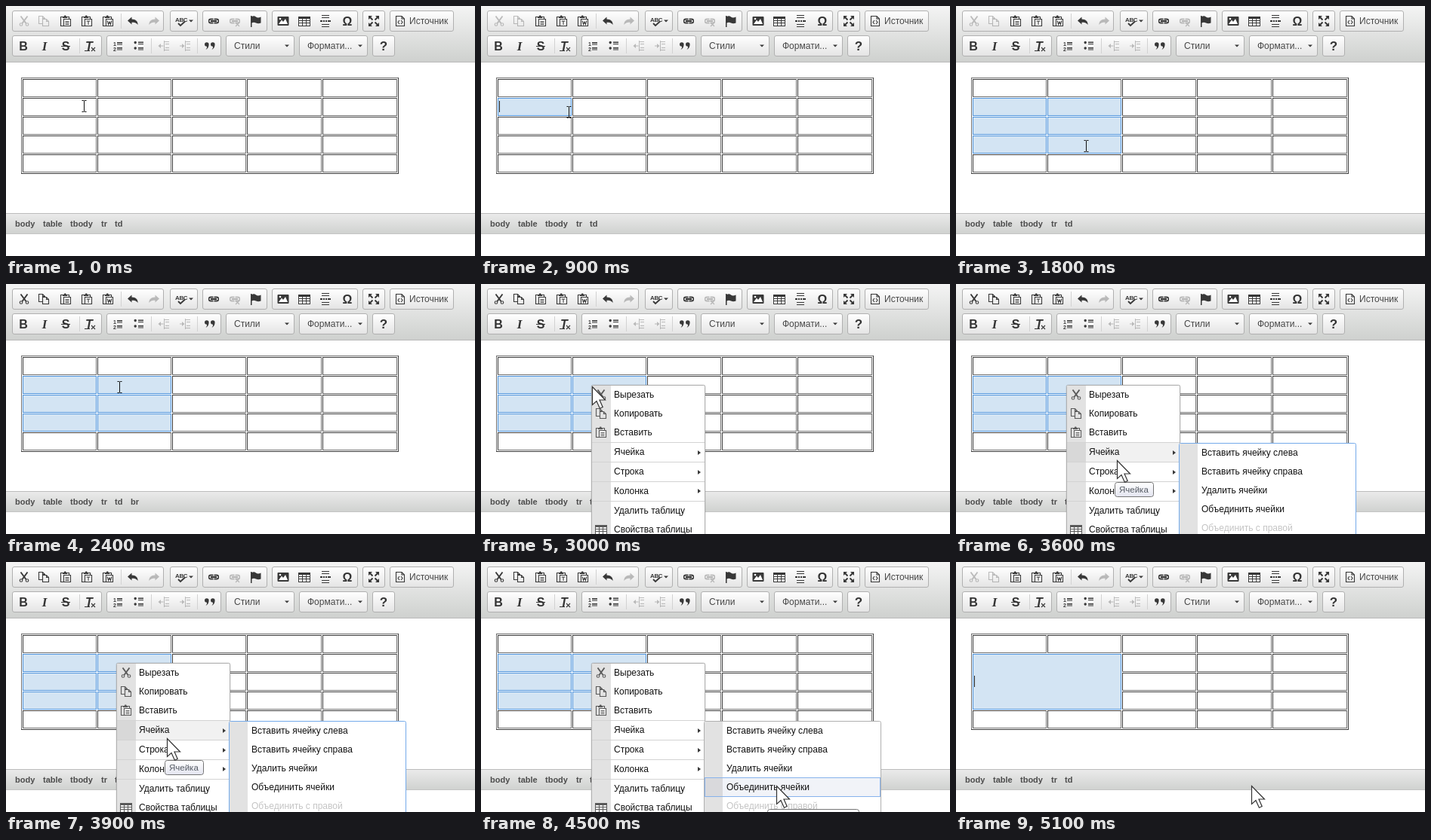
These frames come from a looping animation (621 px wide and 332 px high, 5.4 s). An HTML page:

```html
<!DOCTYPE html>
<html lang="ru">
<head>
<meta charset="utf-8">
<title>Table cell merge</title>
<style>
html, body { margin: 0; width: 100%; height: 100%; overflow: hidden; background: #fff; }
svg { display: block; font: 12px "Liberation Sans", Arial, sans-serif; }
.box { shape-rendering: crispEdges; }
.line { fill: none; stroke: #383838; stroke-width: 1.1; }
.thick { stroke-width: 1.9; }
.page { fill: #fff; }
.ink { fill: #383838; }
.off { opacity: .3; }
.soft { opacity: .8; }
</style>
</head>
<body>
<svg id="stage" width="621" height="332" viewBox="0 0 621 332">
<defs>
  <linearGradient id="bar" x2="0" y2="1"><stop stop-color="#f4f4f4"/><stop offset="1" stop-color="#cfd1cf"/></linearGradient>
  <linearGradient id="foot" x2="0" y2="1"><stop stop-color="#ebebeb"/><stop offset="1" stop-color="#cfd1cf"/></linearGradient>
  <linearGradient id="btn" x2="0" y2="1"><stop stop-color="#fff"/><stop offset="1" stop-color="#e4e4e4"/></linearGradient>
  <linearGradient id="tip" x2="0" y2="1"><stop stop-color="#fff"/><stop offset="1" stop-color="#e4e5f0"/></linearGradient>
  <g id="cut" class="line"><path class="thick" d="M-4.5-6.5L2.5 3M4.5-6.5L-2.5 3"/><circle cx="-4" cy="4.5" r="1.8"/><circle cx="4" cy="4.5" r="1.8"/></g>
  <g id="copy" class="line"><path d="M-2 3.5H-6.5V-6.5H-1.5L1.5-3.5V-2.5M-1.5-6.5V-3.5H1.5"/><path d="M-1.5-2.5H3.5L6.5.5V6.5H-1.5ZM3.5-2.5V.5H6.5"/></g>
  <g id="clip"><path class="line" d="M-2 6.5H-6.5V-5.5H4.5V-3"/><path class="ink" d="M-4-4V-6H-2.5L-1.5-7.5H0L1-6H2V-4Z"/><path class="line page" d="M-2.5-2.5H6.5V6.5H-2.5Z"/></g>
  <g id="paste"><use href="#clip"/><path class="line" d="M-.5 .5H4.5M-.5 2.5H4.5M-.5 4.5H4.5"/></g>
  <g id="pasteT"><use href="#clip"/><path class="line" d="M-.5 0H4.5M2 0V5"/></g>
  <g id="pasteW"><use href="#clip"/><path class="line" d="M-.8-.5L.6 4.5L2 1L3.4 4.5L4.8-.5"/></g>
  <path id="undo" class="ink" d="M-7-.5L-1.5-5.5V-2.5C4-2.5 7 1 6.5 5C4.5 2 2 1.7-1.5 1.7V4.5Z"/>
  <g id="redo"><use href="#undo" transform="scale(-1 1)"/></g>
  <g id="spell"><text class="ink" x="-11" y="1" font-size="8" font-weight="bold" letter-spacing="-.4">ABC</text><path class="line thick" d="M-7 3L-4 6L2 .5"/></g>
  <path id="link" class="line" stroke-linecap="round" d="M-1-2.5H-4Q-6.5-2.5-6.5 0T-4 2.5H-1M1-2.5H4Q6.5-2.5 6.5 0T4 2.5H1M-3.5 0H3.5"/>
  <g id="chain"><use href="#link" y="-.4"/><use href="#link" y=".4"/></g>
  <g id="unlink"><use href="#chain"/><path class="line" d="M1 2L6 7M6 2L1 7"/></g>
  <path id="flag" class="ink" d="M-7-7H-5.5V-6Q-2.5-7.5 0-5.5T6.5-5.5V2.5Q3 4 0 2.5T-5.5 2.5V8H-7Z"/>
  <g id="image"><rect class="ink" x="-7.5" y="-6" width="15" height="12" rx="1"/><path class="page" d="M-6 4L-2-1.5L0 1L3-3L6 4Z"/><circle class="page" cx="-4" cy="-3" r="1.3"/></g>
  <g id="table" class="box"><rect class="ink" x="-8" y="-6" width="16" height="13"/><path class="page" d="M-7-3h4v2h-4zM-2-3h4v2h-4zM3-3h4v2h-4zM-7 0h4v2h-4zM-2 0h4v2h-4zM3 0h4v2h-4zM-7 3h4v3h-4zM-2 3h4v3h-4zM3 3h4v3h-4z"/></g>
  <path id="rule" class="ink box" d="M-5-8H5v1H-5zM-5-5H5v1H-5zM-7-1h3v2h-3zM-3-1h2v2h-2zM0-1h2v2h-2zM3-1h4v2h-4zM-5 4H5v1H-5zM-5 7H5v1H-5z"/>
  <g id="max"><path class="line thick" d="M-5-5L-1.5-1.5M5-5L1.5-1.5M-5 5L-1.5 1.5M5 5L1.5 1.5"/><path class="ink" d="M-7-7H-2L-7-2ZM7-7H2L7-2ZM-7 7H-2L-7 2ZM7 7H2L7 2Z"/></g>
  <g id="source" class="line"><path d="M-5.5-6.5H2L5.5-3V6.5H-5.5ZM2-6.5V-3H5.5"/><path d="M-1-1L-3 1.5L-1 4M1-1L3 1.5L1 4"/></g>
  <path id="bullets" class="ink" d="M-6.5-4.5a1.7 1.7 0 1 1 0 .1zM-6.5 3a1.7 1.7 0 1 1 0 .1zM-1-5.5H6V-4H-1zM-1-3H6V-2H-1zM-1 2H6V3.5H-1zM-1 4.5H6V5.5H-1z"/>
  <g id="numbers" class="ink"><text x="-6" y="-.5" font-size="7" font-weight="bold">1</text><text x="-6" y="6.5" font-size="7" font-weight="bold">2</text><path d="M-1-5H6v1.5H-1zM-1-2.5H6V-1.5H-1zM-1 2H6V3.5H-1zM-1 4.5H6V5.5H-1z"/></g>
  <path id="lines" class="ink" d="M0-6H7v1H0zM2-3H7v1H2zM2 2H7V3H2zM0 5H7V6H0zM0-7H1V7H0z"/>
  <g id="indent"><use href="#lines"/><path class="ink" d="M-7-.6H-4V-3L-.5 0L-4 3V.6H-7Z"/></g>
  <g id="outdent"><use href="#lines"/><path class="ink" d="M-.5-.6H-4V-3L-7.5 0L-4 3V.6H-.5Z"/></g>
  <g id="quote" class="ink"><path id="mark" d="M-7-2a2.8 2.8 0 1 1 5.6 0Q-1.4 3-5.5 5Q-3.5 2.5-4 .8Q-7 .8-7-2Z"/><use href="#mark" x="8"/></g>
  <path id="down" class="ink" d="M-3-1.5H3L0 1.5Z"/>
  <path id="next" class="ink" d="M-2-3L2 0L-2 3Z"/>
  <path id="ibeam" fill="none" stroke="#111" d="M-3-7.5H-1Q0-7.5 0-6.5Q0-7.5 1-7.5H3M-3 7.5H-1Q0 7.5 0 6.5Q0 7.5 1 7.5H3M0-7V7"/>
  <path id="arrow" fill="#fff" stroke="#333" stroke-width="1.2" d="M.5.5V24.5L6 19.5L10.4 29.3L14.2 27.5L10 18H17.5Z"/>
</defs>
</svg>
<script>
const NS = "http://www.w3.org/2000/svg";
const stage = document.getElementById("stage");

function add(parent, tag, attrs, text) {
  const node = document.createElementNS(NS, tag);
  for (const key in attrs) node.setAttribute(key, attrs[key]);
  if (text) node.textContent = text;
  parent.appendChild(node);
  return node;
}
const group = (parent = stage) => add(parent, "g", {});
const fill = (parent, x, y, width, height, color) =>
  add(parent, "rect", { x, y, width, height, fill: color, class: "box" });
const frame = (parent, x, y, w, h, color, stroke, rx = 0) =>
  add(parent, "rect", { x: x + .5, y: y + .5, width: w - 1, height: h - 1, fill: color, stroke, rx });
const label = (parent, x, y, text, color = "#111", extra = {}) =>
  add(parent, "text", { x, y, fill: color, ...extra }, text);
const icon = (parent, name, x, y, look = "") =>
  add(parent, "use", { href: "#" + name, x, y, class: look });
const show = (node, on) => node.setAttribute("visibility", on ? "inherit" : "hidden");

// Toolbar
fill(stage, 0, 0, 621, 74, "url(#bar)");
fill(stage, 0, 74, 621, 1, "#b9b9b9");
const buttons = (y, spans) => spans.forEach(([a, b]) =>
  frame(stage, a, y, b - a, 28, "url(#btn)", "#b0b0b0", 2.5));
buttons(6, [[8, 209], [217, 254], [260, 346], [352, 466], [472, 502], [508, 593]]);
buttons(39, [[8, 127], [133, 285], [291, 382], [388, 479], [485, 515]]);
[[152, 10], [97, 43], [192, 43], [253, 43]].forEach(([x, y]) => fill(stage, x, y, 1, 20, "#d2d2d2"));

const clipIcons = [icon(stage, "cut", 24, 20), icon(stage, "copy", 50, 20)];
[["paste", 79], ["pasteT", 107], ["pasteW", 135], ["undo", 168], ["redo", 196, "off"],
 ["spell", 235], ["down", 245], ["chain", 275], ["unlink", 303, "off"], ["flag", 331],
 ["image", 367], ["table", 395], ["rule", 423], ["max", 487], ["source", 522]]
  .forEach(([name, x, look]) => icon(stage, name, x, 20, look));
[["numbers", 148], ["bullets", 176], ["outdent", 209, "off"], ["indent", 237, "off"],
 ["quote", 270], ["down", 372], ["down", 469]]
  .forEach(([name, x, look]) => icon(stage, name, x, 53, look));

const glyph = (x, y, text, extra) => label(stage, x, y, text, "#333",
  { "font-size": 16, "font-weight": "bold", "text-anchor": "middle", ...extra });
glyph(452, 26, "Ω");
glyph(23, 59, "B");
glyph(51, 59, "I", { "font-style": "italic", "font-size": 17, "font-family": "Liberation Serif, serif" });
glyph(79, 59, "S");
fill(stage, 73, 53, 12, 1, "#333");
glyph(110, 59, "T", { "font-style": "italic" });
fill(stage, 104, 59, 7, 1, "#333");
add(stage, "path", { class: "line", d: "M113 55L118 60M118 55L113 60" });
glyph(500, 59, "?", { "font-size": 17 });
label(stage, 534, 24, "Источник", "#474747");
label(stage, 302, 57, "Стили", "#474747");
label(stage, 399, 57, "Формати...", "#474747");

// Status bar
fill(stage, 0, 275, 621, 28, "url(#foot)");
fill(stage, 0, 275, 621, 1, "#bcbcbc");
fill(stage, 0, 302, 621, 1, "#c4c4c4");
const pathItems = [["body", 12], ["table", 49], ["tbody", 85], ["tr", 126], ["td", 144], ["br", 165]]
  .map(([text, x]) => label(stage, x, 293, text, "#4c4c4c", { "font-size": 11, "font-weight": "bold" }));
const brItem = pathItems[5];

// Table
const colX = [22, 121, 220, 319, 419, 519];
const rowY = [97, 122, 147, 172, 197, 222];
function bevel(x, y, w, h, light, dark) {
  fill(stage, x, y, w, 1, light);
  fill(stage, x, y, 1, h, light);
  fill(stage, x, y + h - 1, w, 1, dark);
  fill(stage, x + w - 1, y, 1, h, dark);
}
bevel(20, 95, 500, 128, "#707070", "#3c3c3c");
for (let r = 0; r < 5; r++)
  for (let c = 0; c < 5; c++)
    bevel(colX[c], rowY[r], colX[c + 1] - colX[c] - 1, 24, "#3c3c3c", "#707070");

const selected = (parent, x, y, w, h) => frame(parent, x, y, w, h, "#d3e4f3", "#4f94dc");
const cells = [];
for (let r = 1; r < 4; r++)
  for (let c = 0; c < 2; c++)
    cells.push({ r, c, node: selected(stage, colX[c], rowY[r], 98, 24) });
const merged = selected(stage, 22, 122, 197, 74);
const caret = fill(stage, 24, 126, 1, 15, "#222");

// Context menu
const menu = group();
frame(menu, 145, 133, 153, 210, "#000", "none", 3).setAttribute("opacity", .12);
frame(menu, 146, 134, 151, 210, "#fff", "#b0b0b0", 2);
fill(menu, 147, 135, 25, 200, "#e2e2e2");
const cellHover = group(menu);
fill(cellHover, 147, 211, 25, 25, "#d8d8d8");
fill(cellHover, 172, 211, 124, 25, "#f1f1f1");
[210, 236, 262, 288].forEach(y => fill(menu, 147, y, 149, 1, "#d3d3d3"));
[["Вырезать", 151], ["Копировать", 176], ["Вставить", 201], ["Ячейка", 227], ["Строка", 253],
 ["Колонка", 279], ["Удалить таблицу", 305], ["Свойства таблицы", 330]]
  .forEach(([text, y]) => label(menu, 176, y, text));
[["cut", 147], ["copy", 172], ["paste", 197], ["table", 326]]
  .forEach(([name, y]) => icon(menu, name, 159, y, "soft"));
[224, 250, 275].forEach(y => icon(menu, "next", 289, y));

// Cell submenu
const submenu = group();
const subBox = frame(submenu, 295, 211, 235, 140, "#fff", "#b0b0b0", 2);
fill(submenu, 296, 212, 24, 130, "#e2e2e2");
const itemHover = group(submenu);
frame(itemHover, 296, 0, 233, 26, "#f1f3f8", "#86b2ec");
fill(itemHover, 297, 1, 23, 24, "#d9d9dc");
["Вставить ячейку слева", "Вставить ячейку справа", "Удалить ячейки", "Объединить ячейки", "Объединить с правой"]
  .forEach((text, i) => label(submenu, 325, 228 + 25 * i, text, i < 4 ? "#111" : "#c4c4c4"));

// Tooltips
const cellTip = group();
frame(cellTip, 210, 263, 52, 20, "url(#tip)", "#767676", 3);
label(cellTip, 216, 277, "Ячейка", "#575d66", { "font-size": 11.5 });
const mergeTip = frame(stage, 379, 328, 122, 20, "url(#tip)", "#767676", 3);

const pointer = add(stage, "use", {});

// Each step lasts STEP ms; cols and rows give the size of the selection
const STEP = 300;
const beam = (x, y, cols = 0, rows = 0, more) => ({ shape: "ibeam", x: x + .5, y, cols, rows, ...more });
const arrow = (x, y, more) => ({ shape: "arrow", x, y, cols: 2, rows: 3, clip: 1, ...more });
const dropped = beam(172, 186, 2, 3);
const opened = arrow(213, 234, { menu: 1, sub: 1, hover: 1, tip: 1 });
const done = { shape: "arrow", x: 391, y: 297, cols: 0, rows: 0, merged: 1, caret: 151 };
const steps = [
  beam(103, 133),
  beam(103, 133, 1, 1, { caret: 126 }),
  beam(108, 136, 1, 1, { caret: 126 }),
  beam(116, 141, 1, 1, { caret: 126 }),
  beam(150, 171, 2, 2),
  beam(165, 178, 2, 3),
  dropped, dropped,
  beam(150, 137, 2, 3, { clip: 1 }),
  beam(147, 140, 2, 3, { clip: 1 }),
  arrow(147, 136, { menu: 1 }),
  arrow(212, 234, { menu: 1, hover: 1, tip: .18 }),
  opened, opened,
  arrow(312, 226, { menu: 1, sub: 1, item: 211 }),
  arrow(391, 297, { menu: 1, sub: 1, item: 286, mergeTip: 1 }),
  { ...done, mergeTip: 1 },
  done
];

function draw(s) {
  clipIcons.forEach(node => node.setAttribute("class", s.clip ? "" : "off"));
  show(brItem, s.clip);
  cells.forEach(({ r, c, node }) => show(node, c < s.cols && r <= s.rows));
  show(merged, s.merged);
  show(caret, s.caret);
  caret.setAttribute("y", s.caret || 0);
  show(menu, s.menu);
  show(cellHover, s.menu && s.hover);
  show(submenu, s.sub);
  subBox.setAttribute("stroke", s.item ? "#b0b0b0" : "#74aaea");
  show(itemHover, s.sub && s.item);
  itemHover.setAttribute("transform", `translate(0 ${s.item || 0})`);
  cellTip.setAttribute("opacity", s.tip || 0);
  show(mergeTip, s.mergeTip);
  pointer.setAttribute("href", "#" + s.shape);
  pointer.setAttribute("x", s.x);
  pointer.setAttribute("y", s.y);
}

const start = performance.now();
let current = 0;
draw(steps[0]);
function tick(now) {
  const index = Math.floor(Math.max(0, now - start) / STEP) % steps.length;
  if (index !== current) draw(steps[current = index]);
  requestAnimationFrame(tick);
}
requestAnimationFrame(tick);
</script>
</body>
</html>
```
